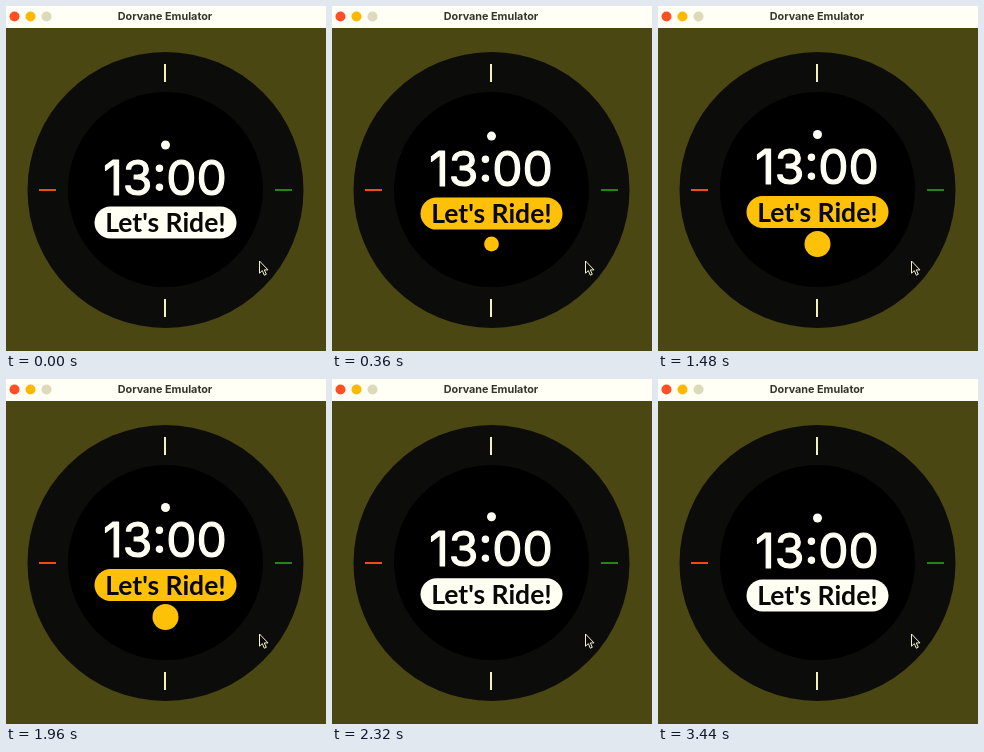
These frames come from a looping animation (320x345 px, 3480 ms). An HTML page:

```html
<!DOCTYPE html>
<html lang="en">
<head>
<meta charset="utf-8">
<title>Watch emulator</title>
<style>
  html, body { margin: 0; width: 100%; height: 100%; overflow: hidden; background: #4b4712; }
  svg { display: block; }
  text { text-anchor: middle; }
  .title { font: 700 10.8px Inter, sans-serif; fill: #37352b; }
  .time { font: 400 48px Inter, sans-serif; fill: #fffff4; stroke: #fffff4; stroke-width: 1.2; stroke-linejoin: round; }
  .label { font: 700 26.5px Lato, sans-serif; fill: #080806; }
  .ticks path { stroke-width: 2; }
</style>
</head>
<body>
<svg width="320" height="345" viewBox="0 0 320 345">
  <rect width="320" height="345" fill="#4b4712"/>
  <rect width="320" height="22" fill="#fffff5"/>
  <circle cx="8.5" cy="10.5" r="5" fill="#ff4f25"/>
  <circle cx="24.5" cy="10.5" r="5" fill="#ffb800"/>
  <circle cx="40.5" cy="10.5" r="5" fill="#dddabb"/>
  <text class="title" x="159" y="14">Dorvane Emulator</text>

  <circle cx="159.5" cy="184" r="138" fill="#0c0c0a"/>
  <circle cx="159.5" cy="183.5" r="97.5"/>
  <g class="ticks">
    <path d="M159 58v18M159 293v18" stroke="#f4f2bd"/>
    <path d="M33 184h17" stroke="#e8501a"/>
    <path d="M269 184h17" stroke="#28801f"/>
  </g>

  <circle id="button" cx="159.5" cy="238" fill="#ffc107"/>
  <g id="panel">
    <circle cx="159.5" cy="139" r="4.5" fill="#fffff4"/>
    <text class="time" x="159" y="188.5">13:00</text>
    <rect id="pill" x="88.5" y="200.5" width="142" height="32" rx="16"/>
    <text class="label" x="159.5" y="226">Let's Ride!</text>
  </g>

  <path d="M253.5 255v12.2l2.8-2.6 2 4.6 2-.9-2-4.4h3.7z" fill="#0a0a06" stroke="#f4f2cf"/>
</svg>
<script>
  const LOOP = 3480, OPEN = 100, CLOSE = 2050, DURATION = 350, LIFT = 10.5;
  const get = id => document.getElementById(id);
  const panel = get('panel'), pill = get('pill'), button = get('button');
  const clamp = v => Math.min(1, Math.max(0, v));
  const ease = v => (1 - Math.cos(Math.PI * clamp(v))) / 2;

  function draw() {
    const t = performance.now() % LOOP;
    const lift = ease((t - OPEN) / DURATION) - ease((t - CLOSE) / DURATION);
    panel.setAttribute('transform', `translate(0 ${-LIFT * lift})`);
    pill.setAttribute('fill', t >= OPEN && t < CLOSE ? '#ffc107' : '#fffff4');
    button.setAttribute('r', 13 * clamp((lift - 0.65) / 0.35));
    requestAnimationFrame(draw);
  }
  draw();
</script>
</body>
</html>
```
